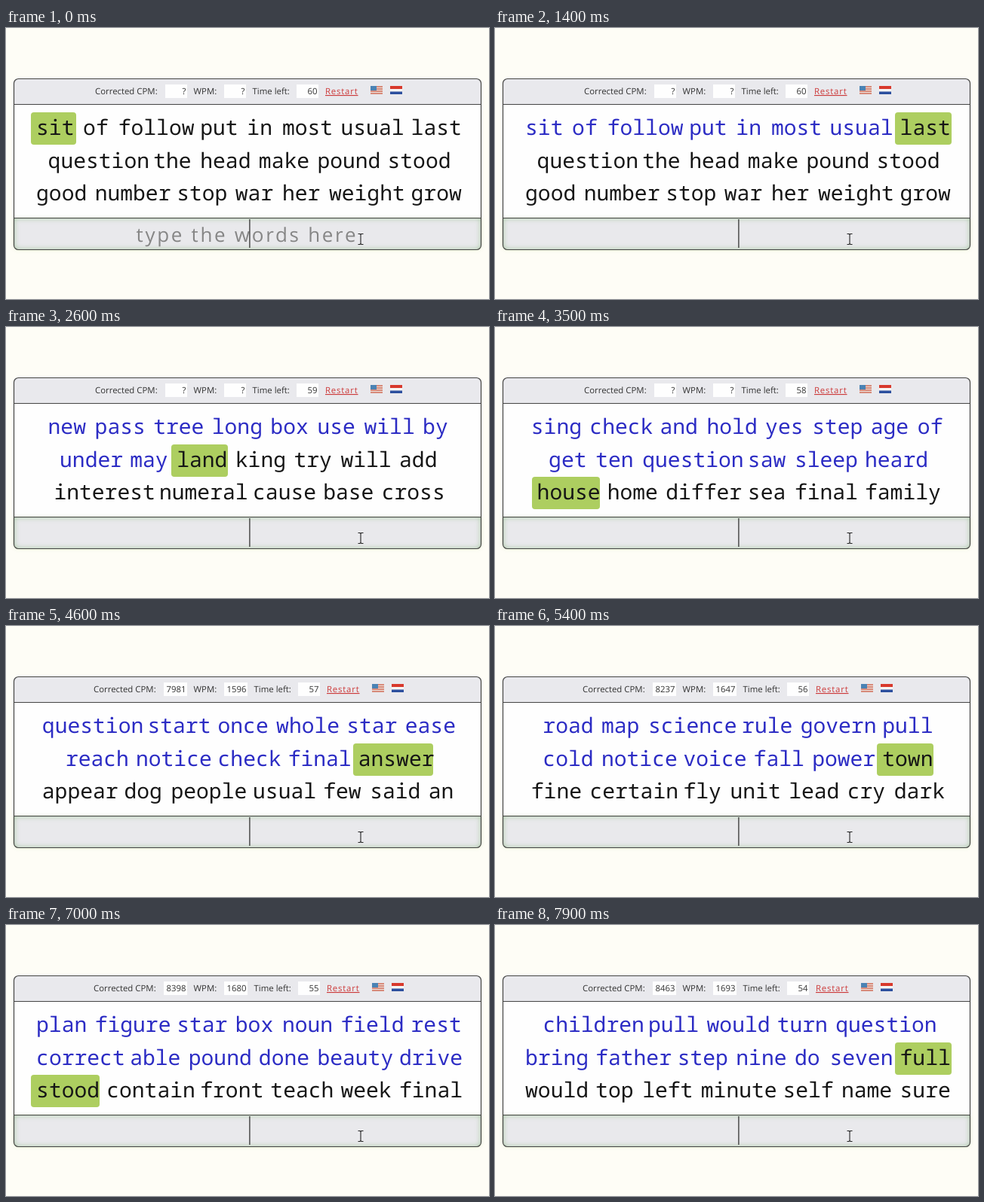
Recreate the animation shown at these times as an HTML page. Size 640 by 360 pixels, loop 8000 ms.

```html
<!DOCTYPE html>
<html lang="en">
<head>
<meta charset="utf-8">
<title>Typing test</title>
<style>
  html, body { margin: 0; width: 100%; height: 100%; overflow: hidden; background: #fefdf6; }
  #stage { position: relative; width: 640px; height: 360px; overflow: hidden; }
  svg { position: absolute; left: 0; top: 0; }
  text, #words { text-rendering: geometricPrecision; }
  svg text { font: 11.4px "Open Sans", "Noto Sans", sans-serif; fill: #333; }
  .value { text-anchor: end; }
  #restart { fill: #cc3a3a; letter-spacing: .8px; text-decoration: underline; }
  #hint { font-size: 26px; letter-spacing: 2.7px; fill: #868686; }
  #entry {
    position: absolute; left: 11px; top: 253px; width: 618px; height: 41px;
    background: #e9e9ec; border-radius: 0 0 6px 6px;
    box-shadow: inset 0 0 7px rgba(130, 180, 120, .6), 0 0 5px rgba(170, 215, 120, .5);
  }
  #words { position: absolute; left: 11px; top: 112px; width: 616px;
    font: 28px/41.5px "Noto Sans Mono", "DejaVu Sans Mono", monospace; color: #161616; }
  .line { display: flex; justify-content: center; height: 43.5px; white-space: nowrap; }
  /* Each word is laid out narrower than its glyphs, so long words run up to the next */
  .line span { flex: none; width: calc(var(--n) * 15.5px); height: 43px;
    padding: 0 6.2px 0 6.8px; margin: 0 1.3px; border-radius: 4px; }
  .done { color: #2c2cc4; }
  .now { background: #adce60; }
</style>
</head>
<body>
<div id="stage">
  <svg width="640" height="360">
    <rect x="10.5" y="67.5" width="619" height="227" rx="6" fill="#fefefe"/>
    <path d="M11 102V73q0-5 5-5H624q5 0 5 5V102z" fill="#e9e9ed"/>
  </svg>
  <div id="entry"></div>
  <div id="words"></div>
  <svg width="640" height="360">
    <g fill="none" stroke="#444" stroke-width="1.2">
      <rect x="10.5" y="67.5" width="619" height="227" rx="6"/>
      <path d="M10 101.5H630M10 252.5H630"/>
    </g>
    <g fill="#fefefe">
      <rect id="cpmBox" y="75" height="18"/>
      <rect id="wpmBox" y="75" height="18"/>
      <rect id="timeBox" y="75" height="18"/>
    </g>
    <text id="cpmLabel" y="88">Corrected CPM:</text>
    <text id="cpm" class="value" y="88"></text>
    <text x="248.5" y="88">WPM:</text>
    <text id="wpm" class="value" y="88"></text>
    <g id="tail">
      <text x="326.5" y="88">Time left:</text>
      <text id="restart" x="423" y="88">Restart</text>
      <g id="flags">
        <rect x="483" y="77" width="16" height="11" fill="#eedfd8"/>
        <path d="M483 78H499M483 81H499M483 84H499M483 87H499" stroke="#d0705c" stroke-width="1.5"/>
        <rect x="483" y="77" width="8" height="6" fill="#4a83b4"/>
        <rect x="509" y="77" width="16" height="4" fill="#d8392c"/>
        <rect x="509" y="81" width="16" height="3.5" fill="#f8f5f3"/>
        <rect x="509" y="84.5" width="16" height="3.5" fill="#2c4f9e"/>
      </g>
    </g>
    <text id="time" class="value" y="88"></text>
    <text id="hint" x="172.5" y="284">type the words here</text>
    <path d="M322.9 254V292" stroke="#333" stroke-width="1.3"/>
    <path d="M466.5 273.5H469L470 274.5L471 273.5H473.5M466.5 287.5H469L470 286.5L471 287.5H473.5M470 274V287"
      fill="none" stroke="#222" stroke-width="1.1"/>
  </svg>
</div>
<script>
const LOOP = 8000, STEP = 100, START = 1100;

const lines = `sit of follow put in most usual last
question the head make pound stood
good number stop war her weight grow
river plain girl money serve ready
new pass tree long box use will by
under may land king try will add
interest numeral cause base cross
sing check and hold yes step age of
get ten question saw sleep heard
house home differ sea final family
light voice power town fine certain
fly unit lead cry dark machine note
question start once whole star ease
reach notice check final answer
appear dog people usual few said an
road map science rule govern pull
cold notice voice fall power town
fine certain fly unit lead cry dark
several yet slow record thought wait
step bird govern try green both like
record was time press up what his
plan figure star box noun field rest
correct able pound done beauty drive
stood contain front teach week final
gave green oh quick develop sleep
children pull would turn question
bring father step nine do seven full
would top left minute self name sure`.split("\n").map(s => s.split(" "));

// Typing progress: time, line, word
const pace = [[START, 0, 0], [1400, 0, 7], [2600, 5, 2], [3500, 9, 0],
  [4600, 13, 4], [6100, 19, 3], [7900, 26, 6]];
const scores = { 57: 7981, 56: 8237, 55: 8398, 54: 8463 };

const $ = id => document.getElementById(id);

// Every word with the character count at which it becomes current
const slots = [];
let total = 0;
lines.forEach((words, line) => words.forEach((w, word) => {
  slots.push({ line, word, at: total });
  total += w.length + 1;
}));
const knots = pace.map(([t, line, word]) =>
  [t, slots.find(s => s.line === line && s.word === word).at]);

function typed(t) {
  if (t <= START) return 0;
  const i = knots.findIndex(k => k[0] >= t);
  const [t0, c0] = knots[i - 1], [t1, c1] = knots[i];
  return c0 + (c1 - c0) * (t - t0) / (t1 - t0);
}

function drawWords(chars) {
  const { line, word } = slots.filter(s => s.at <= chars + .01).pop();
  // The page moves up once the first word of the third line is finished
  const top = Math.max(0, line - (word ? 1 : 2));
  $("words").innerHTML = lines.slice(top, top + 3).map((words, i) => {
    const row = top + i;
    const spans = words.map((w, j) => {
      const kind = row < line || (row === line && j < word) ? "done"
        : row === line && j === word ? "now" : "";
      return `<span class="${kind}" style="--n:${w.length}">${w}</span>`;
    });
    return `<div class="line">${spans.join("")}</div>`;
  }).join("");
}

function field(id, left, right, value) {
  $(id + "Box").setAttribute("x", left);
  $(id + "Box").setAttribute("width", right - left);
  $(id).setAttribute("x", right - 1.5);
  $(id).textContent = value;
}

function drawHeader(t) {
  const left = 60 - Math.max(0, Math.floor((t - START) / 1000));
  const cpm = scores[left];
  const shift = cpm ? 2 : 0;
  $("cpmLabel").setAttribute("x", 118 - shift);
  field("cpm", cpm ? 209 : 211, 240, cpm || "?");
  field("wpm", 289, cpm ? 320 : 318, cpm ? Math.round(cpm / 5) : "?");
  field("time", 385 + shift, 414 + shift, left);
  $("tail").setAttribute("transform", `translate(${shift})`);
}

let last = -1;
function frame(now) {
  const t = Math.floor(now % LOOP / STEP) * STEP;
  if (t !== last) {
    last = t;
    const chars = typed(t);
    drawWords(chars);
    drawHeader(t);
    $("hint").style.display = chars > 0 ? "none" : "";
  }
  requestAnimationFrame(frame);
}
frame(0);
</script>
</body>
</html>
```
